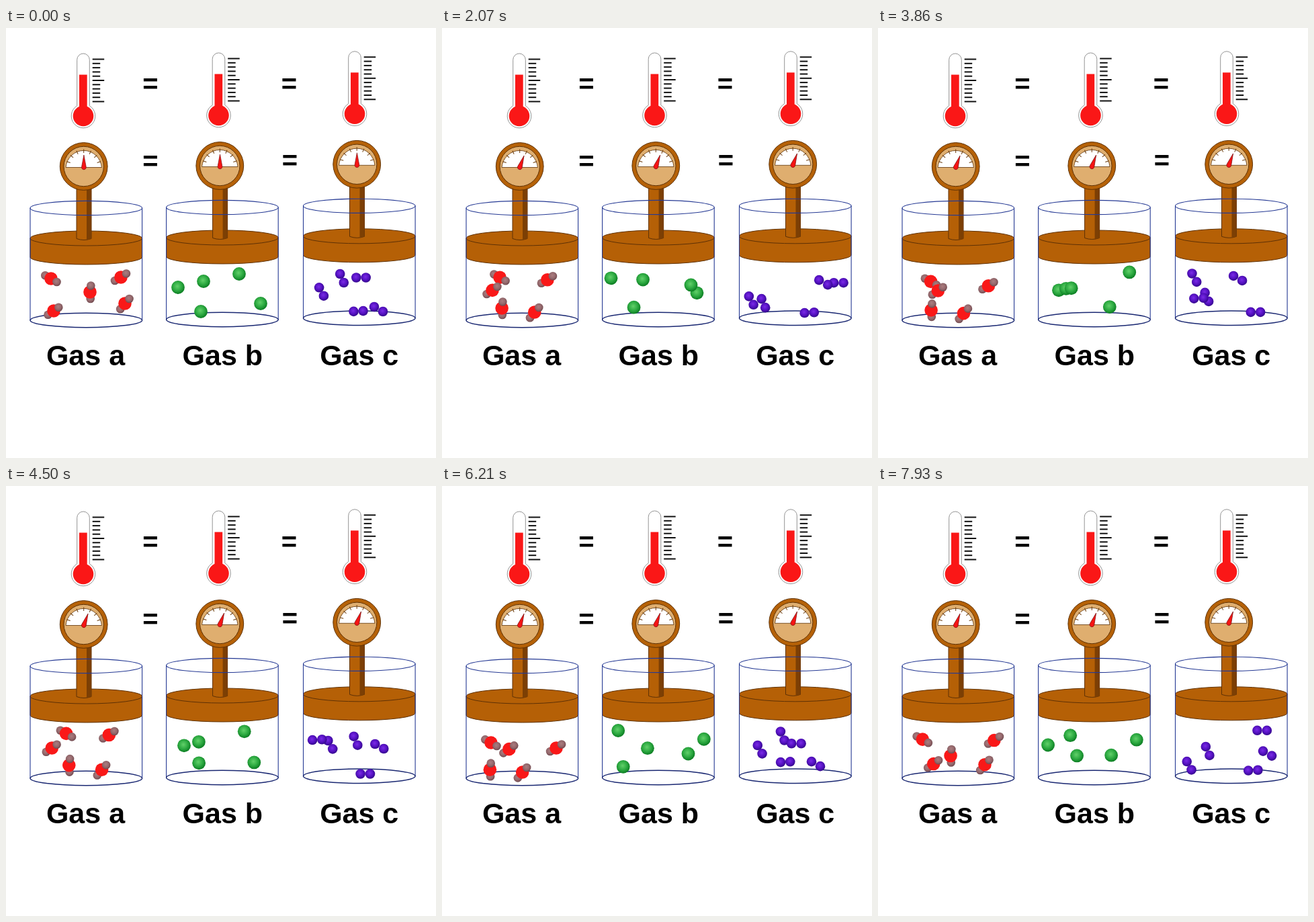
Write an HTML page that moves like this. It is 640 by 640 pixels and loops after 8000 ms.

```html
<!DOCTYPE html>
<html lang="en">
<head>
<meta charset="utf-8">
<title>Gases at equal temperature and pressure</title>
<style>
  html, body { margin: 0; width: 100%; height: 100%; overflow: hidden; background: #fff; }
  svg { display: block; width: 100vw; height: 100vh; }
  text { font: bold 43px "Liberation Sans", Arial, sans-serif; text-anchor: middle; }
  text.equal { font-size: 40px; }
</style>
</head>
<body>
<svg id="stage" viewBox="0 0 640 640">
  <defs>
    <radialGradient id="green" cx=".45" cy=".42" r=".58">
      <stop offset="0" stop-color="#62d06a"/><stop offset=".55" stop-color="#2fac43"/><stop offset="1" stop-color="#0b7d22"/>
    </radialGradient>
    <radialGradient id="purple" cx=".45" cy=".42" r=".58">
      <stop offset="0" stop-color="#7a2be6"/><stop offset=".55" stop-color="#5712c4"/><stop offset="1" stop-color="#33088c"/>
    </radialGradient>
    <radialGradient id="mauve" cx=".45" cy=".42" r=".58">
      <stop offset="0" stop-color="#ab7d80"/><stop offset=".6" stop-color="#94686c"/><stop offset="1" stop-color="#70494e"/>
    </radialGradient>
    <g id="thermometer">
      <path d="M105.7 115.8V47.3a9.3 9.3 0 0 1 18.6 0V115.8A17.8 17.8 0 1 1 105.7 115.8Z" fill="#fff" stroke="#888" stroke-width=".9"/>
      <path d="M109 69.5h11.7V125H109Z" fill="#fa1717"/>
      <circle cx="115" cy="131" r="15.3" fill="#fa1717"/>
      <g id="scale" stroke="#111" stroke-width="2"></g>
    </g>
    <g id="vessel">
      <g fill="#b56006" stroke="#5e3106">
        <path d="M36 313V341A83.3 11 0 0 0 202.6 341V313Z"/>
        <ellipse cx="119.3" cy="313" rx="83.3" ry="11"/>
        <path d="M105 236V313.5Q116 317.5 127 313.5V236Z"/>
      </g>
      <path d="M120 236V315Q124 315 127 313.5V236Z" fill="#7c3f04"/>
      <circle cx="115.7" cy="206" r="35.4" fill="#b56107" stroke="#5e3106"/>
      <circle cx="115.7" cy="206" r="29.7" fill="#dfae6f" stroke="#5e3106"/>
      <path d="M89 207.5A26.8 27.5 0 0 1 142.4 207.5Z" fill="#fff" stroke="#5e3106" stroke-width=".8"/>
      <g id="dial" stroke="#6b3a0a" stroke-width="1"></g>
      <g fill="none" stroke="#263a94" stroke-width="1.1">
        <ellipse cx="119.3" cy="268" rx="83.3" ry="10.6"/>
        <path d="M36 268V435M202.6 268V435"/>
        <ellipse cx="119.3" cy="435" rx="83.3" ry="10.7" stroke="#1a2872" stroke-width="1.5"/>
      </g>
    </g>
    <path id="needle" d="M115.9 189L119.2 206.5A3.4 3.4 0 1 1 112.6 206.5Z" fill="#f51414" stroke="#7a1010" stroke-width=".7"/>
  </defs>
</svg>
<script>
const stage = document.getElementById('stage');

function add(parent, tag, attrs, text) {
  const node = document.createElementNS('http://www.w3.org/2000/svg', tag);
  for (const key in attrs) node.setAttribute(key, attrs[key]);
  if (text) node.textContent = text;
  parent.appendChild(node);
  return node;
}

const scale = document.getElementById('scale');
for (let i = 0; i <= 10; i++) {
  add(scale, 'path', { d: `M128.7 ${46.5 + 6.3 * i}h${i % 5 ? 11.5 : 17.5}` });
}
const dial = document.getElementById('dial');
for (let a = -72; a <= 72; a += 24) {
  add(dial, 'path', { d: 'M115.7 180.5v5.5', transform: `rotate(${a} 115.7 207)` });
}

// Each molecule is a list of atoms: [dx, dy, radius, fill].
const water = (back, front) =>
  [[...back, 6.3, 'url(#mauve)'], [0, 0, 9.8, '#f91818'], [...front, 6.3, 'url(#mauve)']];
const pair = (dx, dy) =>
  [[-dx, -dy, 7.3, 'url(#purple)'], [dx, dy, 7.3, 'url(#purple)']];
const single = [[0, 0, 9.9, 'url(#green)']];

// route: order of the waypoints; progress: legs travelled at each of the key times.
const keyTimes = [0, 1.07, 2.07, 3.21, 4.5, 6.21, 7.93];
const gases = [
  {
    name: 'Gas a', labelX: 118.5, dx: 0, dy: 0, thermometerX: 0,
    route: [0, 1, 2, 1, 3],
    progress: [0, .68, 1.33, 1.98, 2.8, 3.72, 4.74],
    molecules: [
      { atoms: water([-8.7, -4.7], [8.5, 5]), points: [[67, 373], [95, 364], [68, 386], [64.5, 389]] },
      { atoms: water([-9, 5], [8, -5.5]), points: [[171, 371], [148, 364], [175, 396.5], [178.5, 400]] },
      { atoms: water([.7, 10], [1.3, -9.5]), points: [[125, 393], [101, 413.5], [65, 424], [60, 425.5]] },
      { atoms: water([-8.5, 5.7], [7.3, -5.3]), points: [[71, 421], [58, 389.5], [109.5, 392], [116, 392.5]] },
      { atoms: water([-6.8, 8.3], [6.5, -7]), points: [[177, 410], [150, 421], [113, 427], [108, 428]] }
    ]
  },
  {
    name: 'Gas b', labelX: 322.3, dx: 202.6, dy: -1, thermometerX: 201.5,
    route: [0, 1, 2],
    progress: [0, .62, 1.34, 1.91, 2.82, 3.72, 4.68],
    molecules: [
      { atoms: single, points: [[294, 377], [250, 359], [254.5, 398]] },
      { atoms: single, points: [[290, 422], [312, 378], [274, 368]] },
      { atoms: single, points: [[347, 366], [374, 411], [390, 362]] },
      { atoms: single, points: [[379, 410], [394, 364], [325, 418]] },
      { atoms: single, points: [[256, 386], [275, 430], [306, 388]] }
    ]
  },
  {
    name: 'Gas c', labelX: 525.7, dx: 406.5, dy: -3.2, thermometerX: 404,
    route: [0, 1, 2, 3],
    progress: [0, .65, 1.33, 1.93, 2.81, 3.8, 4.67],
    molecules: [
      { atoms: pair(2.8, 6.5), points: [[500, 372.5], [486, 405.3], [463, 418.4], [534, 370]] },
      { atoms: pair(3.4, 6.2), points: [[469.5, 392.5], [460, 428], [460.7, 360.3], [488, 391]] },
      { atoms: pair(7.2, 0), points: [[528.5, 371.5], [593, 360], [585, 418], [523, 431]] },
      { atoms: pair(7.1, -.4), points: [[524.5, 421.5], [575, 424], [489.5, 423], [457, 367]] },
      { atoms: pair(6.5, 3.5), points: [[554.5, 418.5], [592, 388], [518.5, 359.7], [564.5, 394]] }
    ]
  }
];

for (const gas of gases) {
  add(stage, 'use', { href: '#thermometer', x: gas.thermometerX, y: gas.dy });
  add(stage, 'use', { href: '#vessel', x: gas.dx, y: gas.dy });
  const holder = add(stage, 'g', { transform: `translate(${gas.dx} ${gas.dy})` });
  gas.needle = add(holder, 'use', { href: '#needle' });
  for (const molecule of gas.molecules) {
    molecule.node = add(stage, 'g', {});
    for (const [cx, cy, r, fill] of molecule.atoms) add(molecule.node, 'circle', { cx, cy, r, fill });
  }
  add(stage, 'text', { x: gas.labelX, y: 502 }, gas.name);
}
for (const [x, y] of [[215, 97], [421.5, 97], [215, 212], [422.5, 211]]) {
  add(stage, 'text', { x, y, class: 'equal' }, '=');
}

const mix = (a, b, k) => a + (b - a) * k;

function progressAt(values, t) {
  let i = 0;
  while (i < keyTimes.length - 2 && t > keyTimes[i + 1]) i++;
  return mix(values[i], values[i + 1], (t - keyTimes[i]) / (keyTimes[i + 1] - keyTimes[i]));
}

function draw(ms) {
  // The motion advances in 14 steps per second.
  const t = Math.floor((ms % 8000 + 5) * 14 / 1000) % 112 / 14;
  const angle = 20 * Math.min(1, t);
  for (const gas of gases) {
    gas.needle.setAttribute('transform', `rotate(${angle} 115.9 207)`);
    const s = progressAt(gas.progress, t);
    const leg = Math.floor(s);
    const { route } = gas;
    for (const { points, node } of gas.molecules) {
      const from = points[route[leg % route.length]];
      const to = points[route[(leg + 1) % route.length]];
      node.setAttribute('transform', `translate(${mix(from[0], to[0], s - leg)} ${mix(from[1], to[1], s - leg)})`);
    }
  }
}

const start = performance.now();
function tick() {
  draw(performance.now() - start);
  requestAnimationFrame(tick);
}
tick();
</script>
</body>
</html>
```
